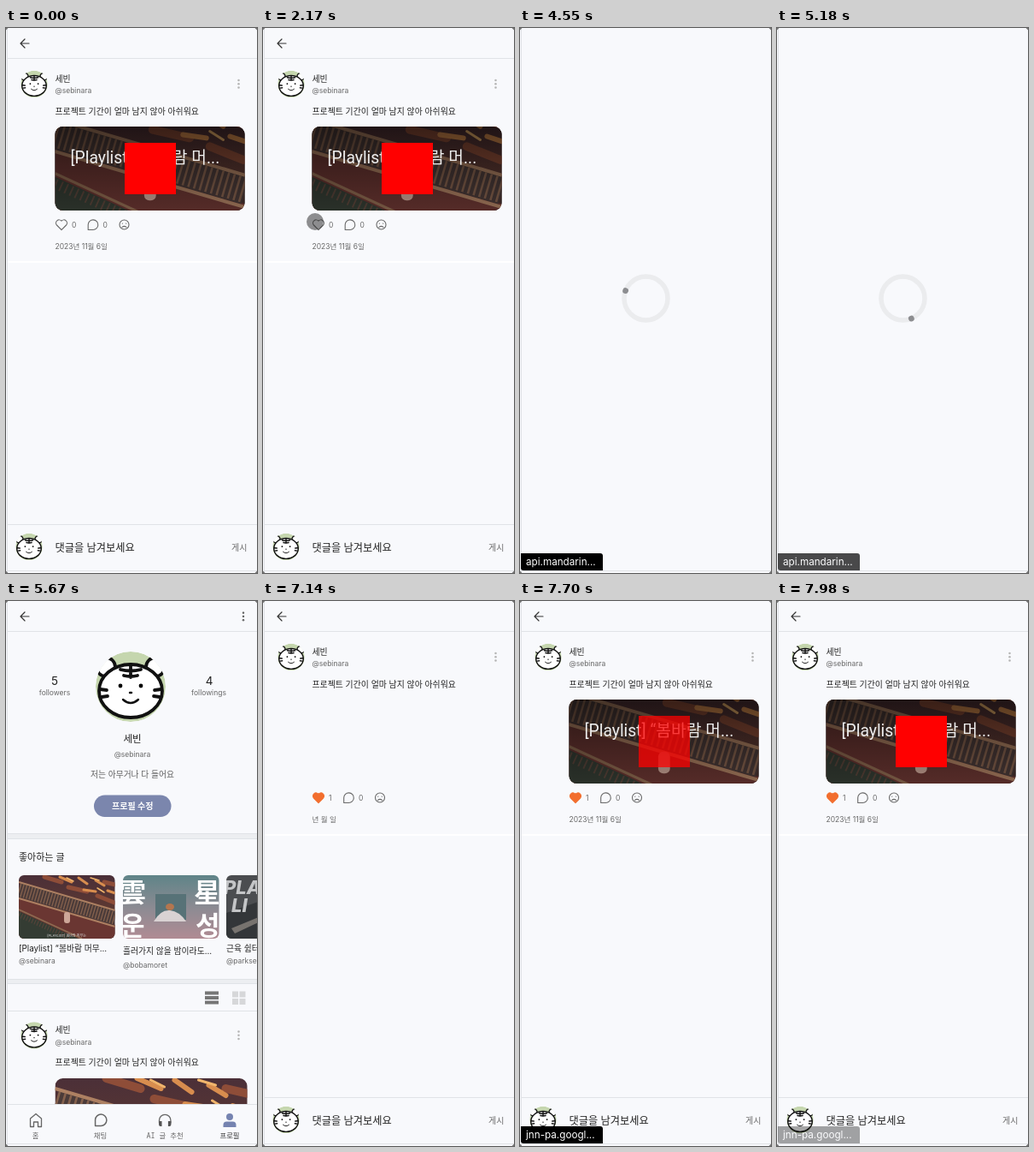
These frames come from a looping animation (294 px wide and 636 px high, 8000 ms). An HTML page:

```html
<!DOCTYPE html>
<html lang="ko">
<head>
<meta charset="utf-8">
<title>Post and profile</title>
<style>
html, body { margin: 0; width: 100%; height: 100%; overflow: hidden; background: #f8f9fc; }
svg { display: block; width: 294px; height: 636px; }
text { font-family: Inter, "Noto Sans CJK KR", "Noto Sans CJK", sans-serif; fill: #222; }
.s { font-size: 8.5px; fill: #686868; }
.b { font-size: 9.9px; }
.t { font-size: 9.8px; }
.n { font-size: 8.4px; fill: #686868; }
.mid { text-anchor: middle; }
.line { stroke: #e0e3e7; fill: none; }
.icon { stroke: #686868; fill: none; stroke-width: 1.1; stroke-linecap: round; stroke-linejoin: round; }
.nav { stroke: #666; stroke-width: 1.3; }
.art text { font: 900 31px "Noto Sans CJK KR", "Noto Sans CJK", sans-serif; fill: #fff; }
.poster text { font: italic 800 22px Inter, sans-serif; fill: #c4c5c7; }
</style>
</head>
<body>
<svg viewBox="0 0 294 636">
<defs>
  <clipPath id="disc"><circle r="41"/></clipPath>
  <clipPath id="tile"><rect width="112.5" height="74" rx="6"/></clipPath>
  <clipPath id="wide"><rect x="57.5" y="115" width="222" height="98" rx="9"/></clipPath>
  <clipPath id="feed"><rect x="57.5" y="557" width="225" height="60" rx="9"/></clipPath>
  <linearGradient id="dusk" x2="0" y2="1">
    <stop stop-color="#4a2f38"/><stop offset=".5" stop-color="#5c3832"/><stop offset="1" stop-color="#33292a"/>
  </linearGradient>
  <linearGradient id="mist" x2="0" y2="1">
    <stop stop-color="#5f8488"/><stop offset=".55" stop-color="#8f8b93"/><stop offset="1" stop-color="#b08b93"/>
  </linearGradient>
  <linearGradient id="shade" x2="0" y2="1">
    <stop stop-color="#000" stop-opacity=".6"/><stop offset="1" stop-color="#000" stop-opacity=".2"/>
  </linearGradient>

  <g id="avatar" clip-path="url(#disc)">
    <circle r="41" fill="#c5d6ae"/>
    <g fill="#fff" stroke="#111" stroke-width="3.8" stroke-linecap="round">
      <circle cx="-29" cy="-23" r="11"/><circle cx="29" cy="-23" r="11"/>
      <ellipse cy="5" rx="37" ry="31"/>
      <path fill="none" d="M0-25V-11M-12-20Q0-17 12-20M-8-13Q0-11 8-13M-36 3l8 1M-34 12l7-1M36 3l-8 1M34 12l-7-1"/>
      <path fill="none" stroke-width="2.4" d="M-9 15Q0 23 9 15M-1 7h2"/>
    </g>
    <circle cx="-12" cy="-1" r="2.4"/><circle cx="12" cy="-1" r="2.4"/>
  </g>

  <g id="scene">
    <rect width="113" height="74" fill="url(#dusk)"/>
    <g fill="none" stroke-linecap="round">
      <path stroke="#8e4d38" stroke-width="5" d="M30 2l20 6M58 14l22 5M92 24l20 8M100 8l13 3"/>
      <path stroke="#d88d4e" stroke-width="3" d="M48 2l14 6M70 3l10 7M76 17l14 2M90 6l10 6M104 18l9 3"/>
      <path stroke="#f0b56c" stroke-width="1.5" d="M56 3l8 4M84 3l10 3M92 15l8 5"/>
    </g>
    <path fill="#6a3632" d="M0 20L113 58V74H0Z"/>
    <path stroke="#4b3b39" stroke-width="17" d="M0 17L113 50"/>
    <path stroke="#85614d" stroke-width="15" stroke-dasharray="1.3 2.2" d="M0 17L113 50"/>
    <path stroke="#ad8062" stroke-width="2" fill="none" d="M0 8L113 41M0 27L113 60"/>
    <path fill="#343c33" d="M0 42L70 74H0Z"/>
    <path stroke="#8e6a50" stroke-width="1.6" d="M0 40L74 74"/>
    <path stroke="#59443a" stroke-width="6" stroke-dasharray="1 2.4" d="M0 46L62 74"/>
    <rect x="53" y="43" width="7" height="13" rx="3" fill="#cda698"/>
  </g>

  <g id="back"><path d="M27 18H17M22 13l-5 5 5 5" fill="none" stroke="#333" stroke-width="1.2" stroke-linecap="round" stroke-linejoin="round"/><path class="line" d="M2 35.5H294"/></g>
  <g id="menu"><circle cy="-4.3" r="1.25"/><circle r="1.25"/><circle cy="4.3" r="1.25"/></g>

  <g id="post">
    <use href="#avatar" transform="translate(33 65.5) scale(.385)"/>
    <text class="b" x="57.5" y="62.7">세빈</text>
    <text class="s" x="57.5" y="76">@sebinara</text>
    <use href="#menu" x="272.5" y="65.3" fill="#b4b4b4"/>
    <text class="b" x="57.5" y="100.7">프로젝트 기간이 얼마 남지 않아 아쉬워요</text>
  </g>
  <path id="bubble" d="M-5.6 6V0A5.8 5.8 0 1 1 0 6Z"/>
</defs>

<rect width="294" height="636" fill="#f8f9fc"/>

<g id="detail">
  <use href="#back"/>
  <use href="#post"/>
  <g id="video" clip-path="url(#wide)">
    <rect x="57" y="115" width="223" height="98" fill="#111"/>
    <g id="still">
      <use href="#scene" transform="translate(57.5 91) scale(1.97)"/>
      <rect x="57" y="115" width="223" height="98" fill="url(#shade)"/>
      <text x="75.5" y="158" style="font:19.3px Roboto,'Noto Sans CJK KR',sans-serif;fill:#eee">[Playlist] “봄바람 머...</text>
    </g>
    <rect id="play" x="139" y="134" width="60" height="60" fill="#f00"/>
  </g>
  <path id="heart" class="icon" d="M65 235.6L59.4 230A3.6 3.6 0 0 1 65 225.2A3.6 3.6 0 0 1 70.6 230Z"/>
  <text id="likes" class="s" x="77" y="232.8">0</text>
  <g id="actions">
    <use href="#bubble" class="icon" x="101.8" y="229.5"/>
    <text class="s" x="113.5" y="232.8">0</text>
    <circle class="icon" cx="138.5" cy="229.5" r="5.5"/>
    <path class="icon" d="M136.3 228v.3M140.7 228v.3M136 232.4q2.5-2 5 0"/>
  </g>
  <text id="date" class="s" x="57.5" y="258"></text>
  <rect x="2" y="272" width="292" height="2" fill="#fff"/>
  <path class="line" d="M2 579.5H294"/>
  <use href="#avatar" transform="translate(27 605.5) scale(.385)"/>
  <text x="57.5" y="610.5" font-size="12.2">댓글을 남겨보세요</text>
  <text x="264" y="609.7" font-size="10" style="fill:#686868">게시</text>
  <circle id="touch" cx="61" cy="226" r="10" fill="#222"/>
</g>

<g id="loader">
  <circle cx="147.5" cy="315.5" r="25.5" fill="none" stroke="#ebecee" stroke-width="5.5"/>
  <circle id="dot" cx="173" cy="315.5" r="3.4" fill="#8c8d90"/>
</g>

<g id="profile">
  <use href="#back"/>
  <use href="#menu" x="278" y="18" fill="#666"/>
  <g class="mid">
    <text x="57" y="98" font-size="13.5">5</text><text class="s" x="57" y="110">followers</text>
    <text x="238" y="98" font-size="13.5">4</text><text class="s" x="237.5" y="110">followings</text>
    <text x="148" y="164.5" font-size="11.5">세빈</text>
    <text class="s" x="148" y="182">@sebinara</text>
    <text x="148" y="205.8" font-size="9.75" style="fill:#5c5c5c">저는 아무거나 다 들어요</text>
    <rect x="103" y="226.5" width="90.5" height="25.5" rx="12.75" fill="#7b86ad"/>
    <text x="148.3" y="243" font-size="10" font-weight="700" style="fill:#fff">프로필 수정</text>
  </g>
  <rect x="2" y="271.5" width="292" height="6" fill="#eceef1"/><path class="line" d="M2 271.5H294M2 277.5H294"/>
  <text x="15" y="303" font-size="11" font-weight="500">좋아하는 글</text>
  <g id="pics">
    <use href="#avatar" transform="translate(146 100)"/>
    <g transform="translate(15 320)" clip-path="url(#tile)">
      <use href="#scene"/>
      <text class="mid" x="56" y="71.5" style="font-size:4px;fill:#ddd">[PLAYLIST] 봄바람 머무는</text>
    </g>
    <g transform="translate(137 320)" clip-path="url(#tile)">
      <rect width="113" height="74" fill="url(#mist)"/>
      <rect x="38" y="22" width="36" height="30" fill="#577277"/>
      <path fill="#d9d2d3" d="M36 54Q44 40 55 41T74 54Z"/><ellipse cx="55" cy="37" rx="5" ry="4" fill="#b4764f"/>
      <g class="art"><text x="-4" y="31">雲</text><text x="-3" y="70">운</text><text x="83" y="31">星</text><text x="85" y="70">성</text></g>
    </g>
    <g transform="translate(258 320)" clip-path="url(#tile)">
      <rect width="113" height="74" fill="#4b4d50"/>
      <path fill="#333639" d="M0 44L40 30V74H0Z"/><path fill="#77736f" d="M6 62L40 48V54L10 68Z"/>
      <g class="poster"><text x="-3" y="22">PLA</text><text x="6" y="43">LI</text></g>
    </g>
  </g>
  <text class="t" x="15" y="408.7">[Playlist] “봄바람 머무...</text><text class="s" x="15" y="423">@sebinara</text>
  <text class="t" x="137" y="411.7">흘러가지 않을 밤이라도...</text><text class="s" x="137" y="428">@bobamoret</text>
  <text class="t" x="258" y="408.7">근육 쉼터</text><text class="s" x="258" y="423">@parkseon</text>
  <rect x="2" y="441" width="292" height="6" fill="#eceef1"/><path class="line" d="M2 441.5H294M2 446.5H294M2 478.5H294"/>
  <path stroke="#767676" stroke-width="4" d="M233 457.5H249M233 463H249M233 468.5H249"/>
  <path fill="#d6d7d9" d="M265 455.5h7v7h-7zM273.5 455.5h7v7h-7zM265 464h7v7h-7zM273.5 464h7v7h-7z"/>
  <use href="#post" y="441.5"/>
  <g clip-path="url(#feed)"><use href="#scene" transform="translate(57.5 553) scale(2)"/></g>
  <rect x="2" y="587" width="292" height="49" fill="#f8f9fc"/><path class="line" d="M2 587.5H294"/>
  <path class="icon nav" d="M28.5 604L35 598.5l6.5 5.5V613.5H37.5V608H32.5V613.5H28.5Z"/>
  <use href="#bubble" class="icon nav" transform="translate(111 605.5) scale(1.15)"/>
  <path class="icon nav" d="M179.5 609V606a6.700 6.700 0 0 1 13.400 0V609"/>
  <path fill="#555" d="M179 607h3.500v6H181a2 2 0 0 1-2-2ZM193.400 607h-3.500v6h1.500a2 2 0 0 0 2-2Z"/>
  <g fill="#7583b0"><circle cx="262" cy="602" r="4"/><path d="M254.5 614V611.5a4 4 0 0 1 4-4h7a4 4 0 0 1 4 4V614Z"/></g>
  <g class="mid">
    <text class="n" x="34.5" y="626.5">홈</text><text class="n" x="110.5" y="626.5">채팅</text>
    <text class="n" x="186" y="626.5" style="font-family:'Noto Sans Mono','Noto Sans CJK KR',monospace">AI 글 추천</text>
    <text class="n" x="262" y="626.5" style="fill:#333">프로필</text>
  </g>
</g>

<path d="M1.5 0V636" stroke="#e0e2e6"/>
<path d="M2 633.5H294" stroke="#e0e2e6"/>
<path fill="#777" d="M0 0h2.5L0 2.5ZM294 0h-2.5l2.5 2.5ZM0 636h2.5L0 633.5ZM294 636h-2.5l2.5-2.5Z"/>

<g id="status">
  <path fill="#000" d="M1 613H94a3 3 0 0 1 3 3V633H4a3 3 0 0 1-3-3Z"/>
  <text id="url" x="7" y="627" font-size="11.7" style="fill:#fff"></text>
</g>
</svg>
<script>
const LOOP = 8000;
const el = Object.fromEntries([...document.querySelectorAll('[id]')].map(e => [e.id, e]));

// Opacity steps: [time in ms, value]
const steps = {
  detail: [[0, 1], [4550, 0], [7140, 1]],
  loader: [[0, 0], [4550, 1], [5390, 0]],
  profile: [[0, 0], [5390, 1], [7140, 0]],
  pics: [[0, 0], [5460, 1]],
  video: [[0, 1], [4550, 0], [7420, 1]],
  still: [[0, 1], [4550, 0], [7560, 1]],
  play: [[0, 1], [4550, 0], [7630, .35], [7700, .75], [7770, 1]],
  touch: [[0, 0], [2170, .5], [2240, .35], [2310, .17], [2380, 0]],
  status: [[0, 0], [4550, 1], [5180, .7], [5250, .35], [5320, 0], [7560, 1], [7910, .7], [7980, .35]]
};
const at = (list, t) => list.findLast(s => s[0] <= t)[1];

function draw(t) {
  for (const id in steps) {
    const v = at(steps[id], t);
    el[id].style.opacity = v;
    el[id].style.display = v ? '' : 'none';
  }
  const liked = t >= 2870;
  el.heart.style.fill = liked ? '#f26e2e' : 'none';
  el.heart.style.stroke = liked ? '#f26e2e' : '#686868';
  el.likes.textContent = liked ? '1' : '0';
  el.actions.setAttribute('transform', `translate(${liked ? -1.5 : 0} 0)`);
  el.date.textContent = t >= 7140 && t < 7350 ? '년 월 일' : '2023년 11월 6일';
  el.url.textContent = t < 7000 ? 'api.mandarin...' : 'jnn-pa.googl...';
  const turn = 200.5 + Math.floor((t - 4550) / 70) * 25.2;
  el.dot.setAttribute('transform', `rotate(${turn} 147.5 315.5)`);
}

function tick() {
  draw(performance.now() % LOOP);
  requestAnimationFrame(tick);
}
tick();
</script>
</body>
</html>
```
